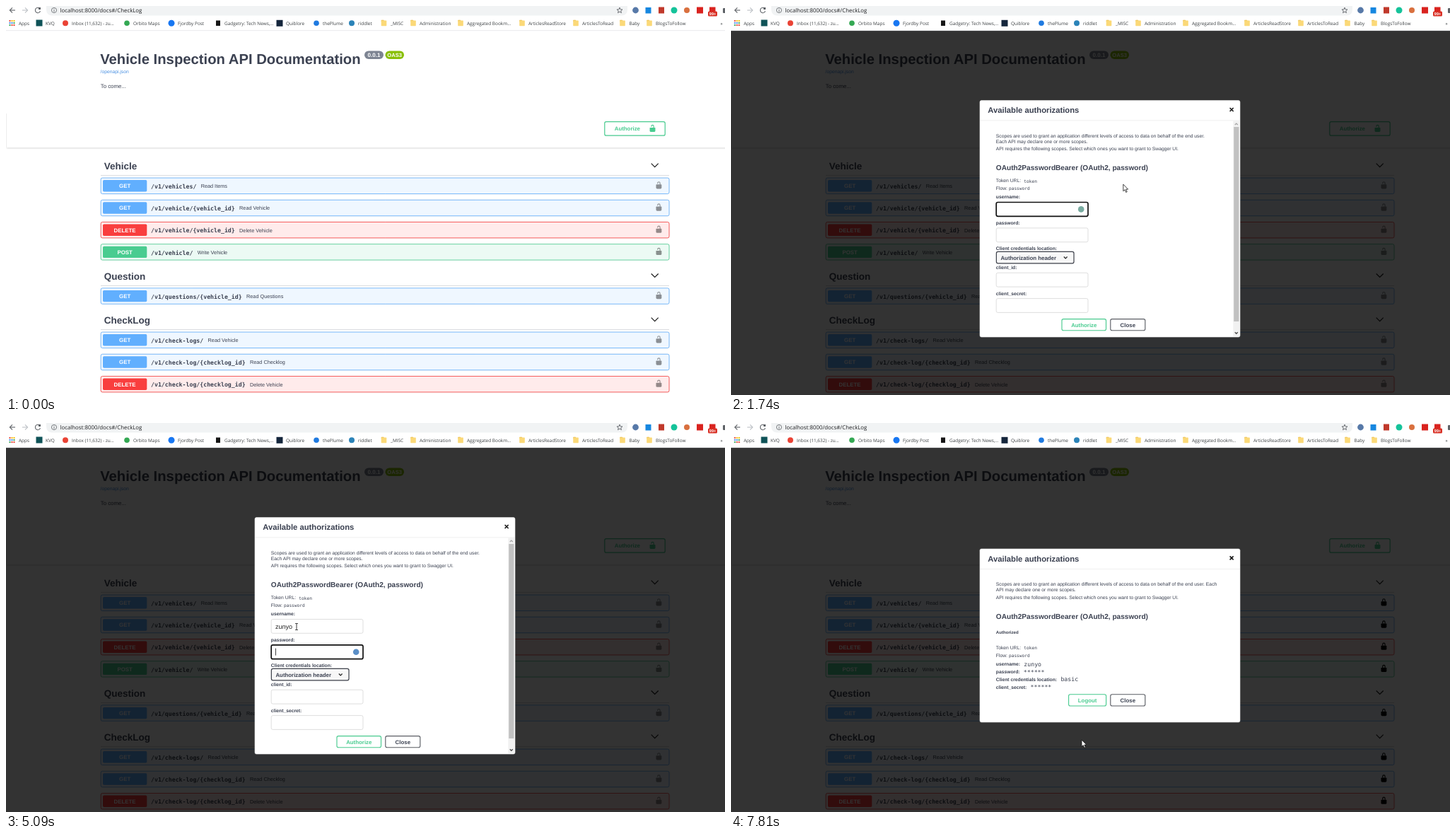
Recreate the animation shown at these times as an HTML page with a canvas. Size 1017 by 550 pixels, loop 7990 ms.

```html
<!DOCTYPE html>
<html lang="en">
<head>
<meta charset="utf-8">
<title>API documentation</title>
<style>
html, body { margin: 0; width: 100%; height: 100%; overflow: hidden; background: #fff; }
canvas { display: block; }
</style>
</head>
<body>
<canvas id="stage" width="1017" height="550"></canvas>
<script>
const ctx = document.getElementById('stage').getContext('2d');
ctx.textRendering = 'geometricPrecision';

const LOOP = 7990;
const SANS = '"Liberation Sans", Arial, sans-serif';
const MONO = '"DejaVu Sans Mono", monospace';
const UI = '"Open Sans", "Noto Sans", sans-serif';
const INK = '#3b4151', GREEN = '#49cc90', BLUE = '#61affe', RED = '#f93e3e';
const USER = 'zunyo';

const sections = [['Vehicle', 225.8], ['Question', 381.6], ['CheckLog', 443.8]];
const rows = [
  ['GET', '/v1/vehicles/', 'Read Items', 254.3],
  ['GET', '/v1/vehicle/{vehicle_id}', 'Read Vehicle', 285.5],
  ['DELETE', '/v1/vehicle/{vehicle_id}', 'Delete Vehicle', 316.7],
  ['POST', '/v1/vehicle/', 'Write Vehicle', 347.9],
  ['GET', '/v1/questions/{vehicle_id}', 'Read Questions', 410.1],
  ['GET', '/v1/check-logs/', 'Read Vehicle', 472.3],
  ['GET', '/v1/check-log/{checklog_id}', 'Read Checklog', 503.5],
  ['DELETE', '/v1/check-log/{checklog_id}', 'Delete Vehicle', 534.7],
];
const methodColor = { GET: BLUE, DELETE: RED, POST: GREEN };

// Text is placed by the vertical middle of its capitals.
function text(str, x, y, size, { color = INK, bold = false, font = SANS, align = 'left' } = {}) {
  ctx.font = `${bold ? 'bold ' : ''}${size}px ${font}`;
  ctx.textAlign = align;
  ctx.fillStyle = color;
  ctx.fillText(str, x, y + size * 0.36);
}

function box(x, y, w, h, { fill, stroke, line = 0.6, radius = 2.25, shadow } = {}) {
  ctx.beginPath();
  ctx.roundRect(x, y, w, h, radius);
  if (fill) {
    ctx.save();
    if (shadow) { ctx.shadowColor = shadow; ctx.shadowBlur = 1.8; }
    ctx.fillStyle = fill;
    ctx.fill();
    ctx.restore();
  }
  if (stroke) {
    ctx.strokeStyle = stroke;
    ctx.lineWidth = line;
    ctx.stroke();
  }
}

function dot(x, y, r, color) {
  ctx.fillStyle = color;
  ctx.beginPath();
  ctx.arc(x, y, r, 0, 7);
  ctx.fill();
}

function lines(points, color, width) {
  ctx.strokeStyle = color;
  ctx.lineWidth = width;
  ctx.beginPath();
  points.forEach(([x, y]) => ctx.lineTo(x, y));
  ctx.stroke();
}

function chevron(x, y, r, width) {
  lines([[x - r, y - r / 2], [x, y + r / 2], [x + r, y - r / 2]], '#1c1c1c', width);
}

function lock(x, y, closed, color) {
  ctx.save();
  ctx.translate(x, y);
  ctx.scale(0.5625, 0.5625);
  ctx.globalAlpha = color === '#000' && !closed ? 0.42 : 1;
  ctx.beginPath();
  ctx.moveTo(-3, closed ? -2 : -4);
  ctx.lineTo(-3, -5);
  ctx.bezierCurveTo(-3, -9.4, 3, -9.4, 3, -5);
  ctx.lineTo(3, -2);
  ctx.strokeStyle = color;
  ctx.lineWidth = 2;
  ctx.stroke();
  box(-7, -2, 14, 11, { fill: color, radius: [1.3, 1.3, 3, 3] });
  ctx.restore();
}

function button(label, x, y, w, h, color) {
  box(x, y, w, h, { fill: '#fff', stroke: color, line: 1.125, shadow: 'rgba(0,0,0,.12)' });
  text(label, x + w / 2, y + h / 2, 7.875, { color: color === GREEN ? GREEN : INK, bold: true, align: 'center' });
}

function folder(x) {
  box(x - 3.8, 19.8, 4, 2, { fill: '#e9bd4f', radius: 0.6 });
  box(x - 3.8, 20.6, 7.6, 7.6, { fill: '#fbd978', radius: 0.6 });
}

function drawBrowser() {
  ctx.fillStyle = '#fff';
  ctx.fillRect(0, 0, 1017, 35);
  box(57, -8, 822, 21.5, { fill: '#f1f3f4', radius: 8 });

  const gray = '#5f6368';
  lines([[13, 6], [5.5, 6]], gray, 1.1);
  lines([[9, 2.4], [5.4, 6], [9, 9.6]], gray, 1.1);
  lines([[23, 6], [30.5, 6]], '#bdc1c6', 1.1);
  lines([[27, 2.4], [30.6, 6], [27, 9.6]], '#bdc1c6', 1.1);
  ctx.strokeStyle = gray;
  ctx.lineWidth = 1.1;
  ctx.beginPath();
  ctx.arc(45, 6, 3.6, 0.3, 5.5);
  ctx.stroke();
  box(46, 2, 3, 3, { fill: gray, radius: 0 });
  ctx.lineWidth = 0.8;
  ctx.beginPath();
  ctx.arc(68, 6, 3.6, 0, 7);
  ctx.stroke();
  lines([[68, 5.5], [68, 8.2]], gray, 0.9);
  lines([[68, 3.7], [68, 4.6]], gray, 0.9);
  text('localhost:8000/docs#/CheckLog', 76.5, 6, 7.85, { color: '#202124', font: UI });

  ctx.strokeStyle = gray;
  ctx.beginPath();
  for (let i = 0; i < 10; i++) {
    const r = i % 2 ? 1.8 : 4.2, a = i * Math.PI / 5 - Math.PI / 2;
    ctx.lineTo(868 + r * Math.cos(a), 6.3 + r * Math.sin(a));
  }
  ctx.closePath();
  ctx.stroke();

  dot(890.5, 6, 4.4, '#5779a8');
  box(904.5, 2, 8, 8.5, { fill: '#1687e0', radius: 0 });
  box(923, 1.5, 8, 9, { fill: '#c0392b', radius: 0 });
  dot(945, 6, 4.5, '#15c39a');
  dot(963, 6, 4, '#d9703f');
  box(977, 1.5, 9, 9, { fill: '#d9231f', radius: 0 });
  box(995, 1.5, 8.5, 7, { fill: '#d9231f', radius: 0 });
  box(993, 7.5, 13, 7, { fill: '#d93025', radius: 1.5 });
  text('99+', 999.5, 11, 5.5, { color: '#fff', bold: true, align: 'center' });
  box(1014, 3, 5, 7, { fill: gray, radius: 1 });

  const gridColors = ['#ea4335', '#34a853', '#4285f4', '#fbbc04'];
  for (let i = 0; i < 9; i++) {
    box(4.5 + (i % 3) * 3, 20 + Math.floor(i / 3) * 3, 2, 2, { fill: gridColors[(i * 3 + (i >> 1)) % 4], radius: 0.3 });
  }
  const mark = { fill: '#0f5257', radius: 0 };
  box(42.5, 19.5, 9, 9, mark);
  dot(84, 24.2, 4, '#ea4335');
  dot(171, 24.2, 3.8, '#34a853');
  dot(234, 24.2, 4.5, '#1877f2');
  box(297, 20.5, 6, 7.5, { fill: '#161616', radius: 0 });
  box(382.5, 19.8, 9, 9, { fill: '#15263c', radius: 0 });
  dot(439, 24.2, 3.8, '#1f7ae0');
  dot(489, 24.2, 4, '#2b83b8');
  [534.5, 576, 643, 730, 806, 872, 910].forEach(folder);
  [
    ['Apps', 18], ['KVQ', 56], ['Inbox (11,632) - zu...', 93], ['Orbito Maps', 180],
    ['Fjordby Post', 243], ['Gadgetry: Tech News,...', 309], ['Quiblore', 396],
    ['thePlume', 448], ['riddlet', 498], ['_MISC', 544], ['Administration', 585],
    ['Aggregated Bookm...', 652], ['ArticlesReadStore', 739], ['ArticlesToRead', 815],
    ['Baby', 881.5], ['BlogsToFollow', 919], ['»', 1010.5],
  ].forEach(([name, x]) => text(name, x, 24.4, 6.45, { color: '#3c4043', font: UI }));
  ctx.fillStyle = '#dfe1e5';
  ctx.fillRect(0, 34.4, 1017, 0.7);
}

function drawRow([method, path, summary, y], closed) {
  const color = methodColor[method];
  box(134.2, y - 11.2, 803.8, 22.4, { fill: '#fff', shadow: 'rgba(0,0,0,.19)' });
  ctx.globalAlpha = 0.1;
  box(134.2, y - 11.2, 803.8, 22.4, { fill: color });
  ctx.globalAlpha = 1;
  box(134.2, y - 11.2, 803.8, 22.4, { stroke: color, line: 0.8 });
  box(137, y - 8.2, 62.3, 16.4, { fill: color, radius: 1.7 });
  text(method, 168.1, y + 0.1, 7.875, { color: '#fff', bold: true, align: 'center' });
  text(path, 205, y + 0.7, 8.22, { bold: true, font: MONO });
  text(summary, 211.3 + path.length * 4.95, y + 0.3, 7.31);
  lock(923.4, y - 0.9, closed, '#000');
}

function drawPage(closed) {
  ctx.fillStyle = '#fff';
  ctx.fillRect(0, 0, 1017, 550);
  text('Vehicle Inspection API Documentation', 133.2, 75, 20.25, { bold: true });
  box(507, 63.4, 27, 11.6, { fill: '#7d8492', radius: 5.8 });
  text('0.0.1', 520.5, 69.3, 8, { color: '#fff', bold: true, align: 'center' });
  box(536.5, 63.4, 26.5, 11.6, { fill: '#89bf04', radius: 5.8 });
  text('OAS3', 549.7, 69.3, 7.6, { color: '#fff', bold: true, align: 'center' });
  text('/openapi.json', 133.5, 92.8, 6.75, { color: '#4990e2' });
  text('To come...', 133.7, 113.3, 7.875);

  ctx.save();
  ctx.shadowColor = 'rgba(0,0,0,.22)';
  ctx.shadowBlur = 2;
  ctx.shadowOffsetY = 0.6;
  ctx.fillStyle = '#fff';
  ctx.fillRect(1, 149, 1020, 51.4);
  ctx.restore();
  ctx.fillStyle = '#fff';
  ctx.fillRect(0, 140, 1017, 12);

  box(846.8, 163.6, 85.4, 19.6, { fill: '#fff', stroke: GREEN, line: 1.2, shadow: 'rgba(0,0,0,.12)' });
  text('Authorize', 860.7, 173.4, 7.875, { color: GREEN, bold: true });
  lock(914.5, 173, closed, GREEN);

  sections.forEach(([name, y]) => {
    text(name, 138.8, y + 0.3, 13.5, { bold: true });
    chevron(917.7, y - 0.6, 5, 1.2);
    ctx.fillStyle = 'rgba(59,65,81,.3)';
    ctx.fillRect(134, y + 13.6, 804, 0.6);
  });
  rows.forEach(row => drawRow(row, closed));
}

function modalFrame(top, height) {
  box(352, top, 368, height, { fill: '#fff', stroke: '#ebebeb' });
  text('Available authorizations', 363.3, top + 13.7, 11.25, { bold: true });
  const y = top + 12.9;
  lines([[705.6, y - 2.5], [710.6, y + 2.5]], '#111', 1.5);
  lines([[705.6, y + 2.5], [710.6, y - 2.5]], '#111', 1.5);
  ctx.fillStyle = '#e6e6e6';
  ctx.fillRect(352, top + 28, 368, 0.6);
}

function modalIntro(top, first, second) {
  text(first, 374.8, top + 49.6, 6.75);
  text(second, 374.8, top + 57.5, 6.75);
  text('API requires the following scopes. Select which ones you want to grant to Swagger UI.', 374.8, top + 68.2, 6.75);
  text('OAuth2PasswordBearer (OAuth2, password)', 374.8, top + 94.9, 10.125, { bold: true });
}

function tokenInfo(y) {
  text('Token URL:', 374.8, y, 6.75);
  text('token', 414.3, y + 0.3, 6.17, { font: MONO });
  text('Flow:', 374.8, y + 10.8, 6.75);
  text('password', 393, y + 11.1, 6.17, { font: MONO });
}

function field(label, y, focusColor) {
  text(label, 374.8, y - 17.4, 6.75, { bold: true });
  box(375.2, y - 9.9, 129.8, 19.8, focusColor
    ? { fill: '#fff', stroke: '#101010', line: 1.7 }
    : { fill: '#fff', stroke: '#d0d0d0', line: 0.7 });
  if (focusColor) dot(495.2, y, 4.3, focusColor);
}

function caret(x, y) {
  ctx.fillStyle = '#111';
  ctx.fillRect(x, y - 5, 0.8, 10);
}

// The last entry that has started gives the current value.
const latest = (steps, t) => steps.reduce((value, [at, next]) => t >= at ? next : value, steps[0][1]);

const typedName = t => latest([
  [0, ''], [2670, 'z'], [2960, 'zu'], [3220, 'z'], [3520, 'zu'], [3700, 'zuk'],
  [4360, 'zu'], [4530, 'zun'], [4710, USER],
], t);
const typedDots = t => latest([[0, 0], [5650, 1], [5830, 2], [6010, 3], [6110, 4], [6210, 5]], t);

function drawForm(t) {
  const focus = t < 5090 ? 'name' : t < 7340 ? 'password' : '';
  modalFrame(133.6, 334.4);
  modalIntro(133.6, 'Scopes are used to grant an application different levels of access to data on behalf of the end user.',
    'Each API may declare one or more scopes.');
  tokenInfo(247);

  ctx.fillStyle = '#f1f1f1';
  ctx.fillRect(710.4, 162.4, 8.8, 304.8);
  ctx.fillStyle = '#c1c1c1';
  ctx.fillRect(711.2, 171, 7.2, 275);
  lines([[712.8, 168], [714.8, 166], [716.8, 168]], '#a3a3a3', 1.2);
  lines([[712.8, 461.2], [714.8, 463.2], [716.8, 461.2]], '#505050', 1.4);

  field('username:', 287.4, focus === 'name' && '#78aaa0');
  field('password:', 323.8, focus === 'password' && '#5b8fc7');
  field('client_id:', 387.2);
  field('client_secret:', 423.5);
  text('Client credentials location:', 374.8, 342.7, 6.75, { bold: true });
  box(375.4, 347.4, 109.6, 16.4, { fill: '#f7f7f7', stroke: '#41444e', line: 1.2, shadow: 'rgba(0,0,0,.25)' });
  text('Authorization header', 381.4, 355.7, 7.875, { bold: true });
  chevron(473.2, 355.7, 2.4, 1.1);

  text(typedName(t), 381, 287.6, 9, { color: '#222' });
  if (t < 1520 || (t >= 2110 && t < 2570)) caret(381.2, 287);
  const dots = typedDots(t);
  for (let i = 0; i < dots; i++) dot(382.7 + i * 3.2, 323.7, 1.15, '#222');
  if (focus === 'password') caret(381.2 + dots * 3.2, 323.6);

  button('Authorize', 468, 442.6, 62.5, 16.2, GREEN);
  button('Close', 536.8, 442.6, 49, 16.2, '#5c5f66');
}

function drawAuthorized() {
  modalFrame(178, 245);
  modalIntro(178, 'Scopes are used to grant an application different levels of access to data on behalf of the end user. Each',
    'API may declare one or more scopes.');
  text('Authorized', 374.8, 296, 6.1, { bold: true });
  tokenInfo(317.3);
  [
    ['username:', USER, 414.3], ['password:', '******', 413.8],
    ['Client credentials location:', 'basic', 466.4], ['client_secret:', '******', 423.6],
  ].forEach(([label, value, x], i) => {
    const y = 341 + i * 10.7;
    text(label, 374.8, y, 6.75, { bold: true });
    text(value, x, y, 8.22, { font: MONO });
  });
  button('Logout', 477.6, 383.8, 53, 16.2, GREEN);
  button('Close', 536.8, 383.8, 49, 16.2, '#5c5f66');
}

function along(path, t) {
  const next = path.findIndex(p => p[0] > t);
  if (next < 0) return path[path.length - 1].slice(1);
  if (next === 0) return path[0].slice(1);
  const [t0, x0, y0] = path[next - 1], [t1, x1, y1] = path[next];
  const u = (t - t0) / (t1 - t0), e = u * u * (3 - 2 * u);
  return [x0 + (x1 - x0) * e, y0 + (y1 - y0) * e];
}

const pointerPath = [
  [80, 952, 486], [720, 881.5, 171], [1000, 881.5, 171], [1260, 882, 170.5],
  [2020, 411, 288], [6569, 411, 288], [6570, 416, 289.5], [6880, 480, 375],
  [7120, 555, 446], [7340, 496, 448],
];

const inside = (x, y, l, t, r, b) => x >= l && x <= r && y >= t && y <= b;

function pointerKind(x, y, t) {
  if (t < 1000) {
    const overRow = x < 938 && [...rows.map(r => r[3]), ...sections.map(s => s[1])].some(c => Math.abs(y - c) < 11.5);
    return overRow || inside(x, y, 846, 163, 933, 184) ? 'hand' : 'arrow';
  }
  if (t >= 7610) return 'arrow';
  if ([287.4, 323.8, 387.2, 423.5].some(c => inside(x, y, 375, c - 10, 505, c + 10))) return 'beam';
  return inside(x, y, 468, 442, 586, 460) ? 'hand' : 'arrow';
}

const shapes = {
  arrow: new Path2D('M0 0V9.6L2.2 7.6L3.8 11.3L5.4 10.6L3.8 7H6.8Z'),
  hand: new Path2D('M-1 1Q0 -.5 1 1V5L2.8 5.2L4.4 5.6L6 6.4V9.4L4.8 12.6H-.4L-3 8.4Q-3.2 7 -1 8.2Z'),
};

function drawPointer(t) {
  if (t < 80) return;
  const [x, y] = along(pointerPath, t);
  const kind = pointerKind(x, y, t);
  if ((t >= 720 && t < 1000) || (t >= 7340 && t < 7430)) dot(x + 0.5, y + 2.5, 7.5, 'rgba(255,238,60,.7)');
  if (kind === 'beam') {
    lines([[x, y - 4.5], [x, y + 4.5]], '#222', 0.9);
    lines([[x - 2, y - 4.5], [x + 2, y - 4.5]], '#222', 0.8);
    lines([[x - 2, y + 4.5], [x + 2, y + 4.5]], '#222', 0.8);
    return;
  }
  ctx.save();
  ctx.translate(x, y);
  ctx.fillStyle = '#fff';
  ctx.strokeStyle = '#111';
  ctx.lineWidth = 0.8;
  ctx.fill(shapes[kind]);
  ctx.stroke(shapes[kind]);
  ctx.restore();
}

function render(t) {
  const authorized = t >= 7610;
  drawPage(authorized);
  if (t >= 1000) {
    ctx.fillStyle = 'rgba(0,0,0,.8)';
    ctx.fillRect(0, 35, 1017, 515);
    if (authorized) drawAuthorized();
    else drawForm(t);
  }
  drawBrowser();
  drawPointer(t);
}

const start = performance.now();
function tick() {
  render((performance.now() - start) % LOOP);
  requestAnimationFrame(tick);
}
tick();
</script>
</body>
</html>
```
